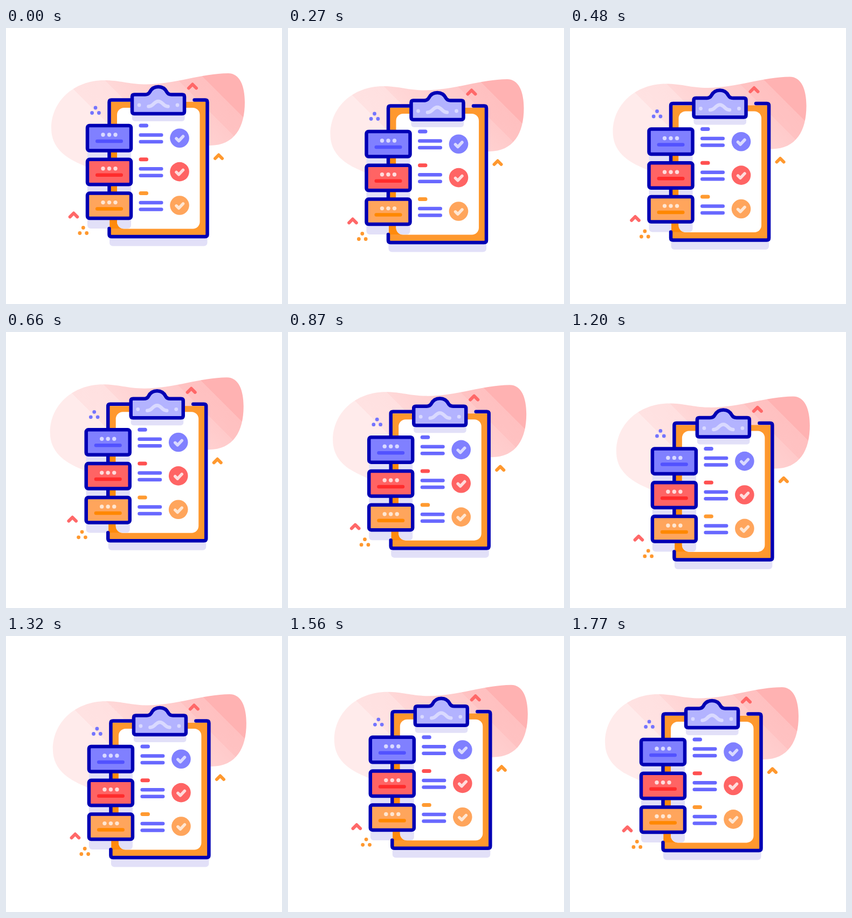
Recreate the animation shown at these times as an HTML page. Size 512 by 512 pixels, loop 1.8 s.

```html
<!DOCTYPE html>
<html lang="en">
<head>
<meta charset="utf-8">
<title>Floating checklist</title>
<style>
  html, body { margin: 0; width: 100%; height: 100%; overflow: hidden; background: #fff; }
  svg { display: block; width: 100%; height: 100%; }
  .outline { stroke: #0000b4; stroke-width: 6.5; stroke-linecap: round; stroke-linejoin: round; fill: none; }
  .chevron { stroke-width: 6; stroke-linecap: round; stroke-linejoin: round; fill: none; }
</style>
</head>
<body>
<svg viewBox="0 0 512 512" xmlns="http://www.w3.org/2000/svg">
  <defs>
    <!-- The offset along this vector is (x - y) / 350 -->
    <linearGradient id="bands" gradientUnits="userSpaceOnUse" x1="0" y1="0" x2="175" y2="-175">
      <stop offset=".032" stop-color="#ffebeb"/>
      <stop offset=".032" stop-color="#ffe2e2"/>
      <stop offset=".246" stop-color="#ffe0e0"/>
      <stop offset=".246" stop-color="#ffd8d8"/>
      <stop offset=".637" stop-color="#ffcaca"/>
      <stop offset=".637" stop-color="#ffc2c2"/>
      <stop offset=".783" stop-color="#ffc0c0"/>
      <stop offset=".783" stop-color="#ffb2b2"/>
    </linearGradient>
    <clipPath id="paperClip"><rect x="206" y="148" width="153.5" height="224.5" rx="13"/></clipPath>
    <g id="cardShadows" fill="#e2e0f8"></g>
  </defs>

  <g id="scene">
    <path fill="url(#bands)" d="M84 186C84 136 126 97 182 97C212 97 228 104.5 260 104.5C312 104.5 364 84 412 84C434 84 443 108 443 138C443 184 424 219 376 218L300 270H190C172 267 158 262 143 254.500C110 241 84 222 84 186Z"/>

    <rect x="192" y="370" width="181.500" height="34.500" rx="6" fill="#e2e0f8"/>
    <use href="#cardShadows"/>
    <rect x="192.500" y="137" width="180" height="249" rx="2" fill="#ff982e"/>
    <rect x="192.500" y="215" width="30" height="157" fill="#ff8a0c"/>
    <rect x="206" y="148" width="153.500" height="224.500" rx="13" fill="#fff"/>
    <g clip-path="url(#paperClip)">
      <use href="#cardShadows"/>
      <rect x="234" y="140" width="97.500" height="33" rx="5" fill="#e2e0f8"/>
    </g>

    <path class="outline" d="M191.500 330V137.500Q191.500 133.500 195.500 133.500H240M349.500 133.500H369.500Q373.500 133.500 373.500 137.500V383Q373.500 387 369.500 387H195.500Q191.500 387 191.500 383V372"/>

    <path class="outline" style="fill:#b3b3ff" d="M238 123.500H258Q264 123.500 266.500 119C270 112 276 109 282.500 109S295 112 298.500 119Q301 123.500 307 123.500H327Q331 123.500 331 127.500V155Q331 159 327 159H238Q234 159 234 155V127.500Q234 123.500 238 123.500Z"/>
    <path d="M264.500 145.500C274 145.500 274 136 282.500 136S291 145.500 300.500 145.500" fill="none" stroke="#d9d9ff" stroke-width="6.500" stroke-linecap="round"/>

    <g id="rows"></g>
    <g id="accents"></g>
  </g>
</svg>
<script>
const byId = id => document.getElementById(id);
const bar = (x1, x2, y, color, width = 6.5) =>
  `<path d="M${x1 + width / 2} ${y}H${x2 - width / 2}" stroke="${color}" stroke-width="${width}" stroke-linecap="round"/>`;
const dot = (x, y, r, color) => `<circle cx="${x}" cy="${y}" r="${r}" fill="${color}"/>`;
const chevron = (x, y, size, color) =>
  `<path class="chevron" stroke="${color}" d="M${x - size} ${y + size}L${x} ${y}l${size} ${size}"/>`;
const trio = (x, y, drop, color) =>
  dot(x, y, 3.4, color) + dot(x - 6.4, y + drop, 3.4, color) + dot(x + 6.4, y + drop, 3.4, color);

const palettes = [
  { fill: '#8080ff', deep: '#5252ff', pale: '#d9d9ff', tag: '#6868ff' },
  { fill: '#ff6464', deep: '#ff2c2c', pale: '#ffdcdc', tag: '#ff5050' },
  { fill: '#ffa55c', deep: '#ff8800', pale: '#ffe6d2', tag: '#ff9a30' }
];
const PITCH = 62.8;

const row = ({ fill, deep, pale, tag }, i) => `<g transform="translate(0 ${i * PITCH})">
  <rect class="outline" style="fill:${fill}" x="151" y="181" width="81" height="46.500" rx="4"/>
  ${[180, 191.5, 203].map(x => dot(x, 198, 3.7, pale)).join('')}
  ${bar(166, 217, 210, deep)}
  ${bar(246.5, 264, 181, tag, 7)}
  ${bar(246.5, 291.5, 198.5, '#6868ff')}
  ${bar(246.5, 291.5, 211, '#6868ff')}
  ${dot(322, 204.2 - i * 0.4, 17.8, fill)}
  <path class="chevron" style="stroke-width:5.500" stroke="${pale}" d="M316 ${205 - i * 0.4}l4.500 4.500 8-8.500"/>
</g>`;

byId('cardShadows').innerHTML = palettes.map((_, i) =>
  `<rect x="151" y="${195 + i * PITCH}" width="81" height="51.500" rx="6"/>`).join('');
byId('rows').innerHTML = palettes.map(row).join('');
byId('accents').innerHTML =
  dot(247, 143, 3.4, '#d9d9ff') + dot(318, 143, 3.4, '#d9d9ff') +
  chevron(346, 104.5, 7, '#ff6868') + chevron(394.5, 235.5, 6.5, '#ff982e') +
  chevron(125.5, 343.5, 6.8, '#ff6868') +
  trio(166, 148, 9.5, '#7474ff') + trio(143.3, 370.5, 10, '#ff982e');

// Irregular drift: [time, offset] keys joined by a smooth curve.
const driftX = [[0, 0], [270, -5.5], [540, -4], [660, -2.3], [1050, 0.4],
                [1320, 2.9], [1430, 3.4], [1560, 1.8], [1620, -1], [1770, -19]];
const driftY = [[0, 0], [270, 11], [330, 11.5], [540, 4], [660, 0.3], [1050, 33.6], [1080, 36.5],
                [1130, 38.7], [1320, 24], [1560, 6.8], [1620, 8.3], [1770, 10.9]];
const LOOP = 1800, STEP = 30;

function slope(keys, i) {
  const a = keys[Math.max(i - 1, 0)], b = keys[i], c = keys[Math.min(i + 1, keys.length - 1)];
  if (a === b || b === c) return (c[1] - a[1]) / (c[0] - a[0]);
  const before = (b[1] - a[1]) / (b[0] - a[0]), after = (c[1] - b[1]) / (c[0] - b[0]);
  return before * after <= 0 ? 0 : 2 * before * after / (before + after);
}

function sample(keys, t) {
  let i = 0;
  while (i < keys.length - 2 && t > keys[i + 1][0]) i++;
  const [t0, v0] = keys[i], [t1, v1] = keys[i + 1];
  const span = t1 - t0, u = (t - t0) / span, w = 1 - u;
  return v0 * w * w * (1 + 2 * u) + v1 * u * u * (3 - 2 * u) +
    span * u * w * (slope(keys, i) * w - slope(keys, i + 1) * u);
}

const scene = byId('scene');
function draw(elapsed) {
  const t = Math.floor((elapsed % LOOP) / STEP) * STEP;
  scene.setAttribute('transform', `translate(${sample(driftX, t).toFixed(2)} ${sample(driftY, t).toFixed(2)})`);
}

const start = performance.now();
function tick(now) {
  draw(Math.max(0, now - start));
  requestAnimationFrame(tick);
}
draw(0);
requestAnimationFrame(tick);
</script>
</body>
</html>
```
